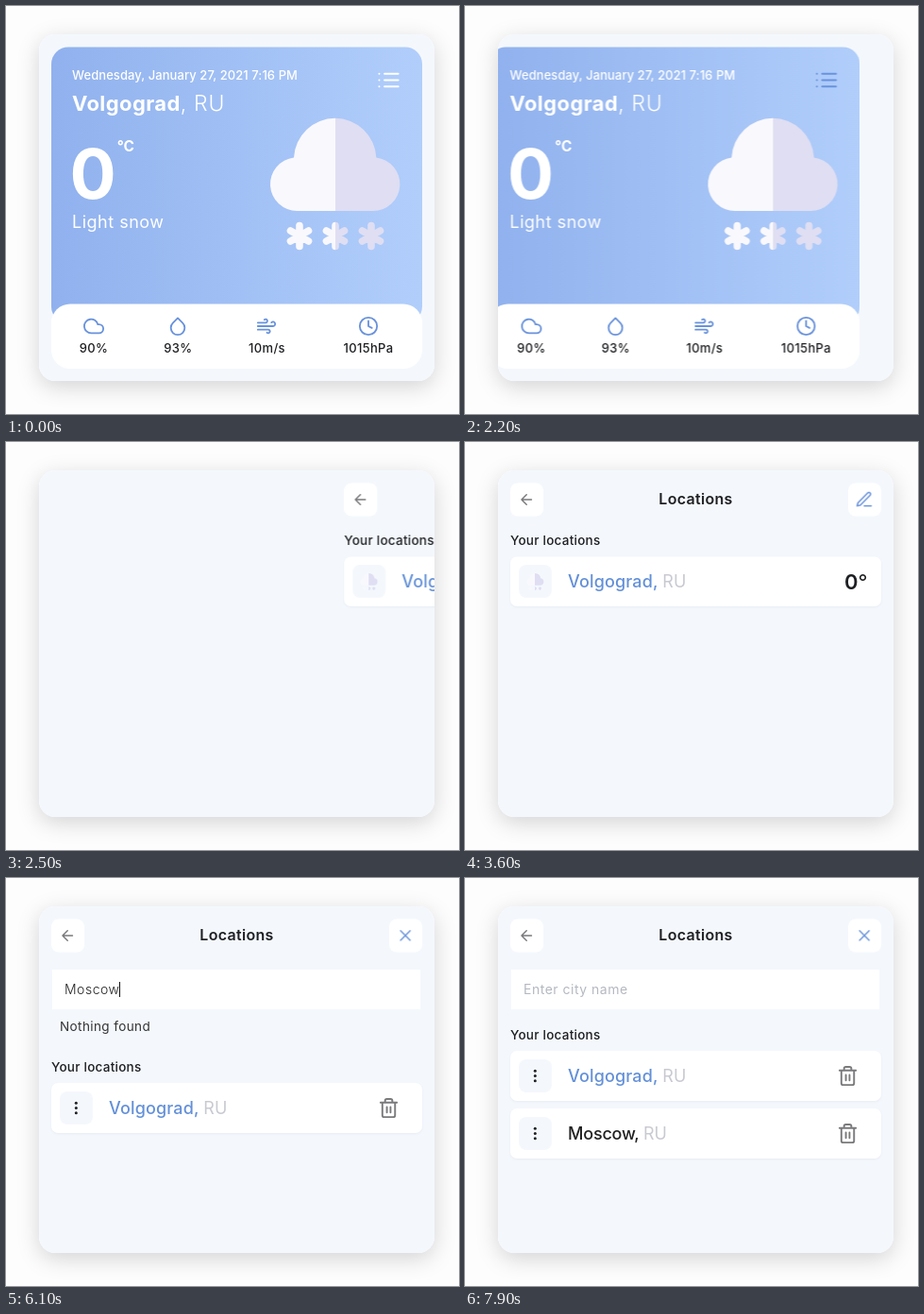
An HTML page for the animation above (8 s loop, 480x432 px).

```html
<!DOCTYPE html>
<html lang="en">
<head>
<meta charset="utf-8">
<title>Weather widget</title>
<style>
html, body { margin: 0; width: 100%; height: 100%; overflow: hidden; background: #fefdfe; }
body { font-family: Inter, "Open Sans", sans-serif; }
.window { position: absolute; left: 35px; top: 30px; width: 419px; height: 367px; overflow: hidden;
  border-radius: 17px; background: #f4f8fd; }
.shadow { position: absolute; left: 35px; top: 30px; width: 419px; height: 367px; border-radius: 17px;
  box-shadow: 0 6px 23px rgba(0, 0, 0, .17); }
svg { position: absolute; left: -35px; top: -30px; }

.icon { fill: none; stroke: currentColor; stroke-width: 2; stroke-linecap: round; stroke-linejoin: round; }
.fine { stroke-width: 1.8; }
.blue { color: #6892dc; }
.gray { color: #7a7a7d; }
.card { fill: #fff; filter: drop-shadow(0 1px 1px rgba(30, 50, 90, .06)); }
.tile { fill: #f4f8fd; }

.white { fill: #fff; }
.date { font-size: 13px; font-weight: 500; letter-spacing: .07px; }
.city { font-size: 22px; font-weight: 700; letter-spacing: .4px; }
.thin { font-size: 23px; font-weight: 300; letter-spacing: .7px; }
.temp { font-size: 73px; font-weight: 700; }
.unit { font-size: 15.5px; font-weight: 700; }
.sky { font-size: 18px; letter-spacing: .5px; }
.stats { font-size: 13px; font-weight: 500; text-anchor: middle; letter-spacing: .35px; fill: #1e1f22; }
.title { font-size: 16px; font-weight: 600; letter-spacing: .3px; text-anchor: middle; fill: #1e1f22; }
.label { font-size: 13.5px; font-weight: 500; letter-spacing: .25px; fill: #1e1f22; }
.note { font-size: 13.5px; letter-spacing: .4px; fill: #333; }
.place { font-size: 18px; font-weight: 500; letter-spacing: .15px; fill: #222; }
.short { letter-spacing: -.2px; }
.here { fill: #6390d8; }
.land { font-weight: 400; fill: #c9cad1; }
.deg { font-size: 22px; font-weight: 600; fill: #1e1f22; }

.entry { position: absolute; left: 27px; top: 79px; height: 18px; line-height: 18px; white-space: nowrap;
  font-size: 14px; font-weight: 300; letter-spacing: .5px; color: #222; }
.entry i { display: inline-block; width: 1px; height: 16px; vertical-align: -3px; background: #111; }
.hint { color: #b4b8c0; font-weight: 400; }

.weather, .locations, .list-btn, .pen, .cross, .view, .field, .edit, .added, .none, .found,
.pics, .plus, .entry, .entry i { animation: 8s linear infinite; }
.view, .field, .edit, .added, .none, .found, .pics, .cross, .entry:not(.hint), .entry i {
  animation-timing-function: step-end; opacity: 0; }

.weather { animation-name: leave; }
.locations { animation-name: enter; }
.list-btn { animation-name: tint-list; }
.pen { animation-name: tint-pen; }
.plus { animation-name: tint-plus; }
.cross, .field { animation-name: editing; }
.view { animation-name: viewing; }
.edit { animation-name: editlist; }
.added { animation-name: added; }
.none { animation-name: none-found; }
.found { animation-name: found; }
.pics { animation-name: pics; }
.hint { animation-name: hint; opacity: 0; }
.k1 { animation-name: k1 !important; }
.k2 { animation-name: k2 !important; }
.k3 { animation-name: k3 !important; }
.k4 { animation-name: k4 !important; }
.k5 { animation-name: k5 !important; }
.entry i { animation-name: blink; }

@keyframes leave {
  0%, 25.547% { transform: none; animation-timing-function: cubic-bezier(1, 0, 0, 1); }
  31.797%, 100% { transform: translateX(-420px); }
}
@keyframes enter {
  0%, 31% { transform: translateX(420px); animation-timing-function: cubic-bezier(.2, .6, .3, 1); }
  34%, 100% { transform: none; }
}
@keyframes tint-list { 0%, 13% { color: #fff; } 16.25%, 100% { color: #6892dc; } }
@keyframes tint-pen {
  0%, 42% { color: #7a7a7d; opacity: 1; }
  45%, 47.2% { color: #6892dc; opacity: 1; }
  47.21%, 100% { color: #6892dc; opacity: 0; }
}
@keyframes tint-plus { 0%, 88.8% { color: #7a7a7d; } 91.25%, 100% { color: #6892dc; } }
@keyframes viewing { 0% { opacity: 1; } 47.2%, 100% { opacity: 0; } }
@keyframes editing { 0% { opacity: 0; } 47.2%, 100% { opacity: 1; } }
@keyframes editlist {
  0% { opacity: 0; transform: none; }
  47.2% { opacity: 1; transform: none; }
  62.2% { opacity: 1; transform: translateY(34px); }
  79.7% { opacity: 0; transform: none; }
  93.5%, 100% { opacity: 1; transform: none; }
}
@keyframes added { 0% { opacity: 0; } 93.5%, 100% { opacity: 1; } }
@keyframes none-found { 0% { opacity: 0; } 62.2% { opacity: 1; } 79.7%, 100% { opacity: 0; } }
@keyframes found { 0% { opacity: 0; } 79.7% { opacity: 1; } 93.5%, 100% { opacity: 0; } }
@keyframes pics { 0% { opacity: 0; } 82.2%, 100% { opacity: 1; } }
@keyframes hint {
  0%, 47.2% { opacity: 0; }
  47.21%, 50.6% { opacity: 1; }
  52.5%, 93.5% { opacity: 0; }
  96.25%, 100% { opacity: 1; }
}
@keyframes k1 { 0% { opacity: 0; } 59.7% { opacity: 1; } 69.7%, 100% { opacity: 0; } }
@keyframes k2 { 0% { opacity: 0; } 69.7% { opacity: 1; } 72.2%, 100% { opacity: 0; } }
@keyframes k3 { 0% { opacity: 0; } 72.2% { opacity: 1; } 73.5%, 100% { opacity: 0; } }
@keyframes k4 { 0% { opacity: 0; } 73.5% { opacity: 1; } 76%, 100% { opacity: 0; } }
@keyframes k5 { 0% { opacity: 0; } 76% { opacity: 1; } 93.5%, 100% { opacity: 0; } }
@keyframes blink {
  0% { opacity: 1; } 64.7% { opacity: 0; } 69.7% { opacity: 1; }
  82.2% { opacity: 0; } 87.2%, 100% { opacity: 1; }
}
</style>
</head>
<body>
<div class="shadow"></div>
<div class="window">
<svg width="480" height="432" viewBox="0 0 480 432">
  <defs>
    <linearGradient id="sky"><stop stop-color="#90b1ee"/><stop offset="1" stop-color="#b1cefb"/></linearGradient>
    <linearGradient id="half" gradientUnits="userSpaceOnUse" x1="279" x2="419" y1="0" y2="0">
      <stop offset=".5" stop-color="#f9f8fd"/><stop offset=".5" stop-color="#dfdef2"/>
    </linearGradient>
    <clipPath id="scroll"><rect x="40" y="90" width="410" height="294"/></clipPath>
    <g id="snow">
      <path fill="url(#half)" d="M308.5 217A28.35 28.35 0 0 1 305 160.5A43.75 43.75 0 0 1 392.4 160.5A28.35 28.35 0 0 1 389 217Z"/>
      <path fill="none" stroke="url(#half)" stroke-width="7.6" stroke-linecap="round"
        d="M311 232.5v22m-9.5 -16.5l19 11m0 -11l-19 11M349 232.5v22m-9.5 -16.5l19 11m0 -11l-19 11M387 232.5v22m-9.5 -16.5l19 11m0 -11l-19 11"/>
    </g>
    <g id="sunny">
      <circle cx="78.5" cy="207.5" r="4.8" fill="#fdeebb"/>
      <path fill="#fad45c" d="M78.5 202.7a4.8 4.8 0 0 1 0 9.6z"/>
      <path fill="#fbfafe" d="M77 206.5v9.5h-4a3.2 3.2 0 0 1-.6-6.3a4.6 4.6 0 0 1 4.6-3.2z"/>
      <path fill="#dfdef2" d="M73.5 207.5q2-1.5 4 0q2 1 2 3q2 .5 2 3q0 2.5-2.5 2.5h-5.5z"/>
    </g>
    <path id="trash" d="M3 6h18M19 6v14a2 2 0 0 1-2 2H7a2 2 0 0 1-2-2V6m3 0V4a2 2 0 0 1 2-2h4a2 2 0 0 1 2 2v2M10 11v6M14 11v6"/>
    <path id="add" d="M5 3h14a2 2 0 0 1 2 2v14a2 2 0 0 1-2 2H5a2 2 0 0 1-2-2V5a2 2 0 0 1 2-2zM12 8v8M8 12h8"/>
    <g id="edit-row">
      <rect class="card" x="48" y="183" width="393" height="53" rx="7"/>
      <rect class="tile" x="57" y="192" width="35" height="35" rx="8"/>
      <g fill="#1e1f22"><circle cx="74.3" cy="204.3" r="1.5"/><circle cx="74.3" cy="209.5" r="1.5"/><circle cx="74.3" cy="214.7" r="1.5"/></g>
      <use href="#trash" class="icon gray" transform="translate(394 198) scale(.96)"/>
    </g>
    <g id="found-row">
      <rect class="card" x="48" y="183" width="387" height="53" rx="7"/>
      <rect class="tile" x="57" y="192" width="35" height="35" rx="8"/>
    </g>
  </defs>

  <g class="weather">
    <rect x="48" y="43.5" width="393" height="292.5" rx="18" fill="url(#sky)"/>
    <rect x="48" y="315.5" width="393" height="68.5" rx="20" fill="#fff"/>
    <g class="white">
      <text class="date" x="70" y="78.3">Wednesday, January 27, 2021 7:16 PM</text>
      <text class="city" x="70" y="111">Volgograd<tspan class="thin">, RU</tspan></text>
      <text class="temp" x="67.5" y="204">0</text>
      <text class="unit" x="117.7" y="154">°C</text>
      <text class="sky" x="70" y="235">Light snow</text>
    </g>
    <path class="icon fine list-btn" transform="translate(392.1 65.1) scale(1.12)"
      d="M8 6h13M8 12h13M8 18h13M3 6h.01M3 12h.01M3 18h.01"/>
    <use href="#snow"/>
    <g class="icon blue">
      <path transform="translate(82 328) scale(.917)" d="M18 10h-1.26A8 8 0 1 0 9 20h9a5 5 0 0 0 0-10z"/>
      <path transform="translate(171 328) scale(.917)" d="M12 2.69l5.66 5.66a8 8 0 1 1-11.31 0z"/>
      <path transform="translate(265 328) scale(.917)" d="M9.59 4.59A2 2 0 1 1 11 8H2m10.59 11.41A2 2 0 1 0 14 16H2m15.73-8.27A2.5 2.5 0 1 1 19.5 12H2"/>
      <path transform="translate(373 328) scale(.917)" d="M2 12a10 10 0 1 0 20 0a10 10 0 1 0-20 0M12 6v6l4 2"/>
    </g>
    <g class="stats">
      <text x="93" y="367">90%</text>
      <text x="182.3" y="367">93%</text>
      <text x="276.5" y="367">10m/s</text>
      <text x="384" y="367">1015hPa</text>
    </g>
  </g>

  <g class="locations">
    <rect x="48" y="43.5" width="35" height="35" rx="8" fill="#fff"/>
    <rect x="406" y="43.5" width="35" height="35" rx="8" fill="#fff"/>
    <path class="icon gray" transform="translate(56.2 52) scale(.75)" d="M19 12H5M12 19l-7-7 7-7"/>
    <path class="icon fine pen" transform="translate(413 51) scale(.83)" d="M12 20h9M16.5 3.5a2.121 2.121 0 0 1 3 3L7 19l-4 1 1-4L16.5 3.5z"/>
    <path class="icon fine blue cross" transform="translate(413.2 51) scale(.83)" d="M18 6L6 18M6 6l12 12"/>
    <text class="title" x="244.5" y="66">Locations</text>

    <g class="view">
      <text class="label" x="48" y="109">Your locations</text>
      <rect class="card" x="48" y="121.5" width="393" height="52.5" rx="7"/>
      <rect class="tile" x="57" y="130" width="35" height="35" rx="8"/>
      <use href="#snow" transform="translate(29.1 123.5) scale(.13)"/>
      <text class="place here" x="109" y="154">Volgograd, <tspan class="land">RU</tspan></text>
      <text class="deg" x="402" y="155.5">0<tspan font-weight="400">°</tspan></text>
    </g>

    <rect class="field" x="49" y="97" width="390" height="42" fill="#fff"/>
    <text class="note none" x="57" y="162">Nothing found</text>

    <g class="edit">
      <text class="label" x="48" y="171">Your locations</text>
      <use href="#edit-row"/>
      <text class="place here" x="109" y="216">Volgograd, <tspan class="land">RU</tspan></text>
      <g class="added">
        <use href="#edit-row" y="61"/>
        <text class="place short" x="109" y="277">Moscow, <tspan class="land">RU</tspan></text>
      </g>
    </g>

    <g class="found" clip-path="url(#scroll)">
      <rect x="435" y="96" width="6" height="288" fill="#f4f8fd"/>
      <rect x="435" y="96" width="6" height="199" fill="#c4c5c8"/>
      <text class="label" x="48" y="171">Finded locations</text>
      <use href="#found-row"/>
      <use href="#found-row" y="61"/>
      <use href="#found-row" y="122"/>
      <use href="#found-row" y="183"/>
      <g class="pics">
        <use href="#sunny"/><use href="#sunny" y="61"/><use href="#sunny" y="122"/>
      </g>
      <g class="place short">
        <text x="109" y="216">Moscow, <tspan class="land">RU</tspan></text>
        <text x="109" y="277">Moscow, <tspan class="land">US</tspan></text>
        <text x="109" y="338">Moscow, <tspan class="land">US</tspan></text>
      </g>
      <use href="#add" class="icon plus" transform="translate(388.6 198) scale(.97)"/>
      <g class="icon gray">
        <use href="#add" transform="translate(388.6 259) scale(.97)"/>
        <use href="#add" transform="translate(388.6 320) scale(.97)"/>
        <use href="#add" transform="translate(388.6 381) scale(.97)"/>
      </g>
    </g>
  </g>
</svg>
<div class="entry hint">Enter city name</div>
<div class="entry k1">M<i></i></div>
<div class="entry k2">Mos<i></i></div>
<div class="entry k3">Mosc<i></i></div>
<div class="entry k4">Mosco<i></i></div>
<div class="entry k5">Moscow<i></i></div>
</div>
</body>
</html>
```
